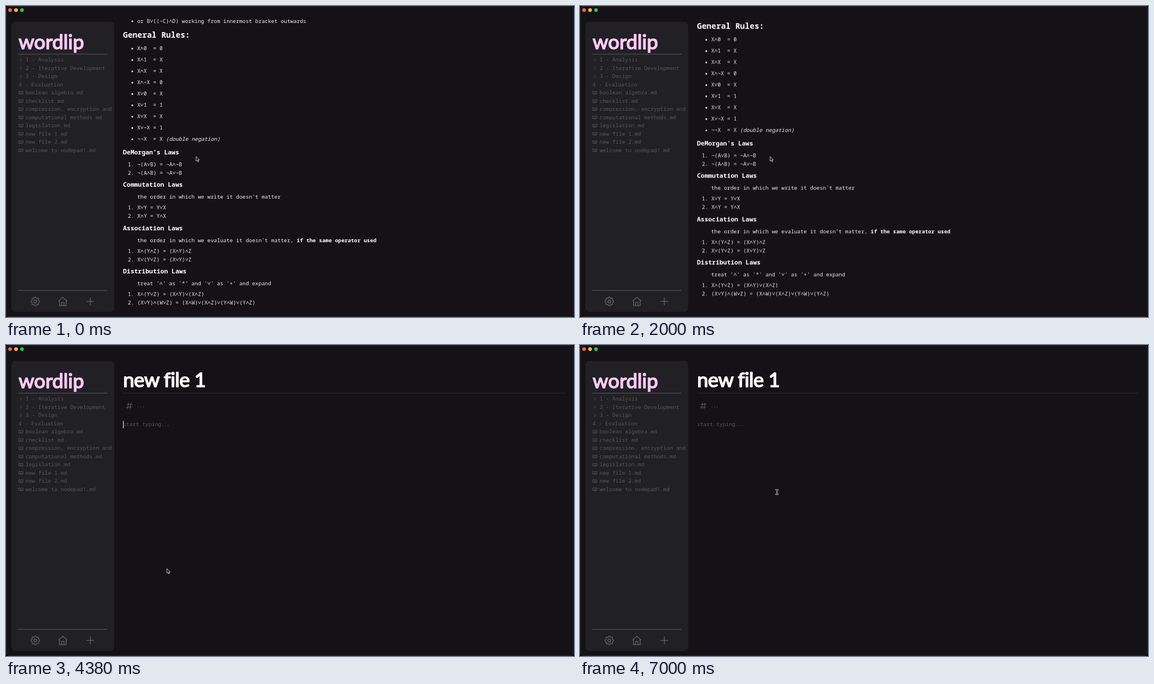
Write an HTML page that moves like this. It is 1000 px wide and 549 px high and loops after 7.17 s.

```html
<!DOCTYPE html>
<html lang="en">
<head>
<meta charset="utf-8">
<title>Note editor</title>
<style>
  html, body { margin: 0; width: 100%; height: 100%; overflow: hidden; background: #000; }
  svg { display: block; width: 1000px; height: 549px; }
  text { font: 9.375px "Noto Sans Mono", "DejaVu Sans Mono", monospace; fill: #efedf1; white-space: pre; }
  .h2 { font-size: 14.06px; font-weight: 700; fill: #fff; }
  .h3 { font-size: 10.97px; font-weight: 700; fill: #fff; }
  .b { font-weight: 700; fill: #fff; }
  .i { font-style: italic; }
  .dim { fill: #58565c; }
  .dots { fill: #68666c; letter-spacing: -.9px; }
  .tag { font-size: 8.75px; fill: #5b4561; }
  .title { font: 35px Lato, sans-serif; fill: #fff; stroke: #fff; stroke-width: 1.6px;
    stroke-linejoin: round; letter-spacing: -.5px; }
  .brand { fill: #ffcbf8; stroke: #ffcbf8; letter-spacing: 0; }
  .icon { fill: none; stroke: #5b595f; stroke-width: 1.5; stroke-linecap: round; stroke-linejoin: round; }
  .thin { stroke-width: .9; }
  .close { stroke: #68586e; stroke-width: 1.1; }
  .caret { fill: #f4f2f6; }

  /* One loop is 7170 ms; 1% is 71.7 ms. */
  .anim { animation: 7.17s step-end infinite; }
  #notes { animation-name: notes; }
  #scroll { animation-name: scroll; }
  #noteCaret { animation-name: noteCaret; }
  #file { animation-name: file; }
  #tags { animation-name: tags; }
  #noTags { animation-name: noTags; }
  #body { animation-name: body; }
  #fileCaret { animation-name: fileCaret; }
  #plus { animation-name: plus; }
  #arrow { animation-name: arrow; }
  #hand { animation-name: hand; }
  #beam { animation-name: beam; }
  #pointer { animation: move 7.17s linear infinite; }

  @keyframes notes { 0% { visibility: visible } 42.399%, 100% { visibility: hidden } }
  @keyframes file { 0% { visibility: hidden } 42.399%, 100% { visibility: visible } }
  @keyframes scroll {
    0% { transform: none }
    27.336% { transform: translateY(-8px) }
    27.894%, 100% { transform: translateY(-15.7px) }
  }
  @keyframes noteCaret {
    0%, 10.46%, 24.407%, 38.354%, 100% { opacity: 0 }
    3.487%, 17.434%, 31.381% { opacity: 1 }
  }
  @keyframes tags { 0% { opacity: 1 } 44.77%, 100% { opacity: 0 } }
  @keyframes noTags { 0% { opacity: 0 } 44.77%, 100% { opacity: 1 } }
  @keyframes body { 0% { transform: translateY(.5px) } 44.77%, 100% { transform: none } }
  @keyframes fileCaret {
    0%, 58.159%, 72.106%, 86.053% { opacity: 1 }
    51.185%, 65.132%, 79.079%, 95.258%, 100% { opacity: 0 }
  }
  @keyframes plus { 0%, 51.743%, 100% { stroke: #5b595f } 40.725% { stroke: #ffcbf8 } }
  @keyframes arrow { 0%, 51.743% { opacity: 1 } 40.725%, 77.2%, 100% { opacity: 0 } }
  @keyframes hand { 0%, 51.743%, 100% { opacity: 0 } 40.725% { opacity: 1 } }
  @keyframes beam { 0% { opacity: 0 } 77.2%, 100% { opacity: 1 } }
  @keyframes move {
    0%, 31.8% { transform: translate(334.7px, 265.8px); animation-timing-function: ease-in-out }
    31.939% { transform: translate(334.7px, 265.8px); animation-timing-function: ease-in-out }
    41.283%, 51.185% { transform: translate(154.6px, 523.4px); animation-timing-function: ease-in-out }
    53.556% { transform: translate(292px, 432px); animation-timing-function: ease-out }
    55.788%, 58.159% { transform: translate(283.3px, 414px); animation-timing-function: ease-out }
    61.088%, 75.593% { transform: translate(283.3px, 394.8px); animation-timing-function: ease-in }
    77.824% { transform: translate(351.7px, 131px); animation-timing-function: ease-out }
    82.566%, 84.798% { transform: translate(375.5px, 100px); animation-timing-function: ease-in-out }
    94.7% { transform: translate(346.6px, 247px); animation-timing-function: ease-out }
    97.629%, 100% { transform: translate(346.6px, 259.5px) }
  }
</style>
</head>
<body>
<svg viewBox="0 0 1000 549">
  <defs>
    <clipPath id="page"><rect x="196" y="19" width="800" height="530"/></clipPath>
    <clipPath id="list"><rect x="9" y="86" width="178" height="410"/></clipPath>
  </defs>

  <rect x=".5" y=".5" width="999" height="548" rx="5" fill="#141217" stroke="#302e33" stroke-width=".8"/>
  <circle cx="7.2" cy="7.3" r="3.2" fill="#ff5f57"/>
  <circle cx="17.7" cy="7.3" r="3.2" fill="#febc2e"/>
  <circle cx="28.1" cy="7.3" r="3.2" fill="#28c840"/>

  <rect x="9.5" y="28" width="181" height="512" rx="7" fill="#212024"/>
  <text class="title brand" x="22.3" y="75.7">wordlip</text>
  <path class="icon" stroke-linecap="butt" d="M22 85H178M22 502H178" style="stroke-width:1.2"/>
  <g id="files" clip-path="url(#list)"></g>

  <path id="gear" class="icon"/>
  <circle class="icon" cx="51.6" cy="521.5" r="2.6"/>
  <path class="icon" d="M92.7 520.5L100 514.2L107.3 520.5M94.2 519.5V529H105.8V519.5M97.8 529V523.2H102.2V529"/>
  <path id="plus" class="icon anim" d="M142.3 521.5H154.7M148.5 515.3V527.7"/>

  <g id="notes" class="anim" clip-path="url(#page)">
    <g id="scroll" class="anim">
      <rect id="noteCaret" class="caret anim" x="206" y="536" width="1" height="13"/>
    </g>
  </g>

  <g id="file" class="anim">
    <text class="title" x="206.3" y="73.6">new file 1</text>
    <path d="M206 85H984" stroke="#2b292e"/>
    <path class="icon" style="stroke-width:1.1" d="M212.6 104.8H222.2M211.8 109.8H221.4M215.8 102.2L213.9 112.2M220.3 102.2L218.4 112.2"/>
    <g id="tags" class="anim">
      <rect x="228" y="99.5" width="108.3" height="15.8" rx="7.9" fill="#242227"/>
      <rect x="341.5" y="99.5" width="35" height="15.8" rx="7.9" fill="#242227"/>
      <text class="tag" x="235" y="110.6">computer science</text>
      <text class="tag" x="348.8" y="110.6">cs</text>
      <path class="icon close" d="M324 104.2l5.6 5.6m0-5.6l-5.6 5.6M364.2 104.2l5.6 5.6m0-5.6l-5.6 5.6"/>
      <text class="dots" x="383" y="110.5">...</text>
    </g>
    <text id="noTags" class="dots anim" x="229.6" y="110.2">...</text>
    <g id="body" class="anim">
      <text class="dim" x="206" y="143.4">start typing<tspan class="dots">...</tspan></text>
      <rect id="fileCaret" class="caret anim" x="206" y="134" width="1" height="13"/>
    </g>
  </g>

  <g id="pointer">
    <path id="arrow" class="anim" d="M0 0V8L1.9 6.4L3.1 9.2L4.5 8.6L3.3 5.9H5.6Z" fill="#0c0b0d" stroke="#f4f4f4" stroke-width=".8" stroke-linejoin="round"/>
    <path id="hand" class="anim" d="M-.3 .2Q.6-.6 1.1.5L1.9 3L4.2 3.5Q5 3.8 4.9 5.2L4.4 8H1.2L-1.2 5Q-1.1 4.1.3 4.8Z" fill="#fff" stroke="#111" stroke-width=".4"/>
    <g id="beam" class="anim" fill="none" stroke-linecap="round">
      <path d="M-1.9-4Q0-4 0-3Q0-4 1.9-4M-1.9 4Q0 4 0 3Q0 4 1.9 4M0-3V3" stroke="#d8d7da" stroke-width="2"/>
      <path d="M-1.6-4Q0-4 0-3Q0-4 1.6-4M-1.6 4Q0 4 0 3Q0 4 1.6 4M0-3V3" stroke="#111" stroke-width=".7"/>
    </g>
  </g>
</svg>

<script>
  const $ = id => document.getElementById(id);

  function add(parent, tag, attrs, html = "") {
    const el = document.createElementNS("http://www.w3.org/2000/svg", tag);
    for (const key in attrs) el.setAttribute(key, attrs[key]);
    el.innerHTML = html;
    parent.append(el);
  }
  const write = (parent, x, y, html, cls = "") => add(parent, "text", { x, y, class: cls }, html);

  // Sidebar: folders, one bare entry, then documents
  const folders = ["1 - Analysis", "2 - Iterative Development", "3 - Design"];
  const docs = ["boolean algebra", "checklist", "compression, encryption and decryption",
    "computational methods", "legislation", "new file 1", "new file 2", "welcome to nodepad!"];
  const rowY = i => 95 + 14.5 * i;
  const entry = (x, i, name) => write($("files"), x, rowY(i) + 3.2, name, "dim");
  const icon = (i, d) =>
    add($("files"), "path", { class: "icon thin", d, transform: `translate(26.2 ${rowY(i) + .3})` });

  folders.forEach((name, i) => {
    icon(i, "M-1.2-2.4L1.2 0L-1.2 2.4");
    entry(34.4, i, name);
  });
  entry(22, 3, "4 - Evaluation");
  docs.forEach((name, i) => {
    icon(i + 4, "M0-1.6Q-.5-2.5-1.6-2.5H-3.6V2H-1.2Q-.2 2 0 2.8Q.2 2 1.2 2H3.6V-2.5H1.6Q.5-2.5 0-1.6V2.6");
    entry(34.4, i + 4, name + ".md");
  });

  // Gear outline: a circle with eight soft teeth
  let gear = "";
  for (let i = 0; i <= 96; i++) {
    const a = i / 96 * 2 * Math.PI;
    const r = 6.9 + Math.max(-.8, Math.min(.8, 1.4 * Math.cos(8 * a)));
    gear += `${i ? "L" : "M"}${(51.6 + r * Math.cos(a)).toFixed(2)} ${(521.5 + r * Math.sin(a)).toFixed(2)}`;
  }
  $("gear").setAttribute("d", gear + "Z");

  // Notes page
  const page = $("scroll");
  function bullet(y, html) {
    add(page, "circle", { cx: 222.4, cy: y - 3, r: 1.6, fill: "#efedf1" });
    write(page, 231, y, html);
  }
  function law(y, heading, quote, ...items) {
    write(page, 206, y, heading, "h3");
    if (quote) write(page, 231, y + 21, quote);
    const top = y + (quote ? 40.1 : 20.4);
    items.forEach((item, i) => write(page, 214.4, top + 15.2 * i, `${i + 1}. ${item}`));
  }

  bullet(30, "or B∨((¬C)∧D) working from innermost bracket outwards");
  write(page, 206, 56, "General Rules:", "h2");
  ["X∧0  = 0", "X∧1  = X", "X∧X  = X", "X∧¬X = 0", "X∨0  = X", "X∨1  = 1", "X∨X  = X", "X∨¬X = 1",
    '¬¬X  = X <tspan class="i">(double negation)</tspan>'].forEach((rule, i) => bullet(78.3 + 20 * i, rule));

  law(262.4, "DeMorgan's Laws", "", "¬(A∨B) = ¬A∧¬B", "¬(A∧B) = ¬A∨¬B");
  law(319, "Commutation Laws", "the order in which we write it doesn't matter", "X∨Y = Y∨X", "X∧Y = Y∧X");
  law(395.5, "Association Laws",
    'the order in which we evaluate it doesn\'t matter, <tspan class="b">if the same operator used</tspan>',
    "X∧(Y∧Z) = (X∧Y)∧Z", "X∨(Y∨Z) = (X∨Y)∨Z");
  law(471.7, "Distribution Laws", "treat '∧' as '*' and '∨' as '+' and expand",
    "X∧(Y∨Z) = (X∧Y)∨(X∧Z)", "(X∨Y)∧(W∨Z) = (X∧W)∨(X∧Z)∨(Y∧W)∨(Y∧Z)");
</script>
</body>
</html>
```
